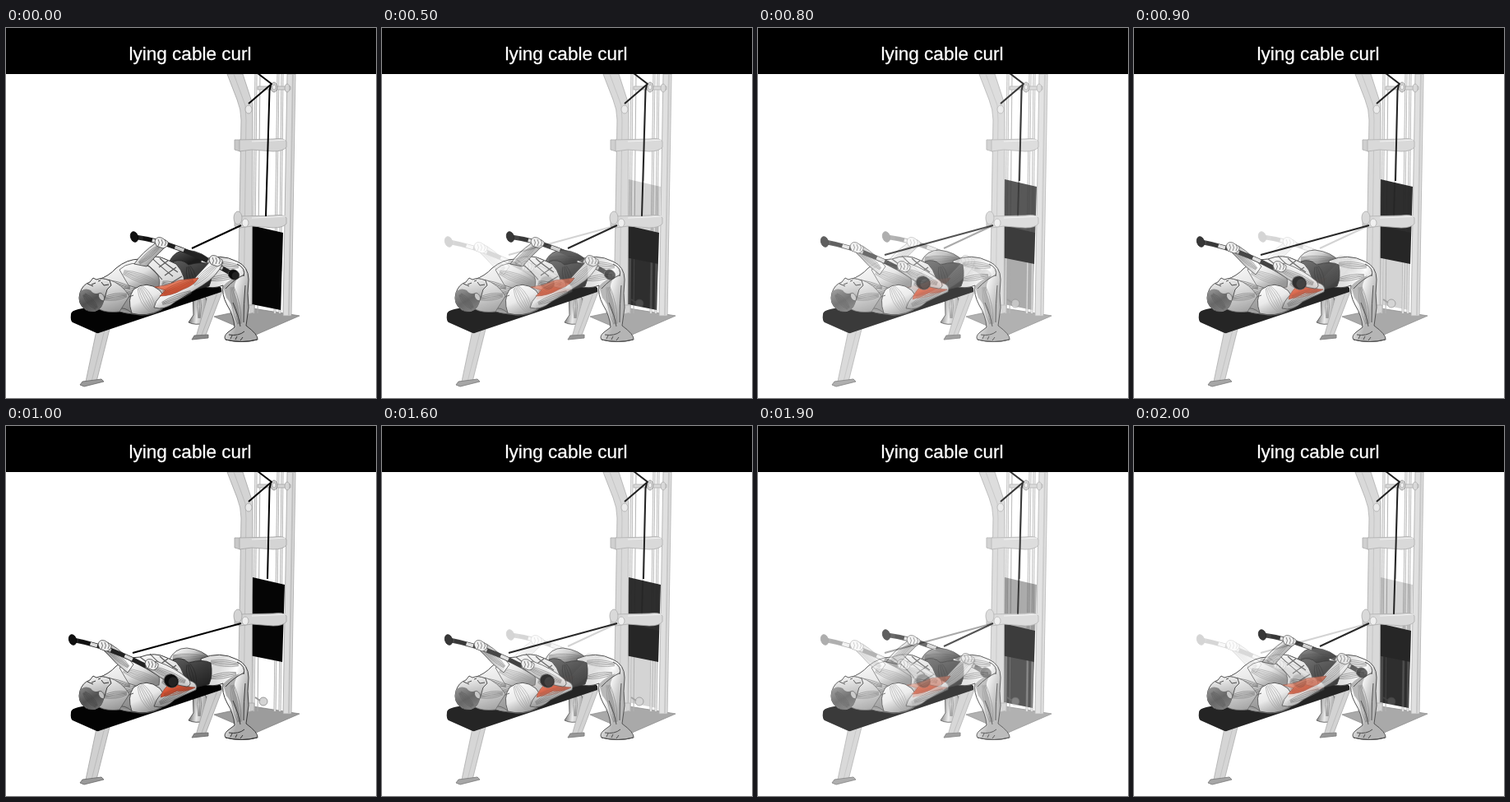
Animation, 450 px wide and 450 px high, one loop 2.1 s. Source, as an HTML page with a canvas:

```html
<!DOCTYPE html>
<html lang="en">
<head>
<meta charset="utf-8">
<title>lying cable curl</title>
<style>
  html, body { margin: 0; width: 100%; height: 100%; overflow: hidden; background: #fff; }
  canvas { display: block; width: 450px; height: 450px; }
</style>
</head>
<body>
<canvas id="stage" width="450" height="450"></canvas>
<script>
const SIZE = 450, LOOP = 2100, STEP = 100;
const INK = '#3a3a3a', METAL = '#d4d4d4', EDGE = '#a2a2a2';
const stage = document.getElementById('stage').getContext('2d');
let g;

function shape(d, fill, stroke, width = 0.8) {
  const path = new Path2D(d);
  if (fill) { g.fillStyle = fill; g.fill(path); }
  if (stroke) { g.strokeStyle = stroke; g.lineWidth = width; g.stroke(path); }
}

const line = (d, color, width = 1) => shape(d, null, color, width);

function oval(x, y, rx, ry, fill, stroke, turn = 0) {
  g.beginPath();
  g.ellipse(x, y, rx, ry, turn, 0, 7);
  g.fillStyle = fill;
  g.fill();
  if (stroke) { g.strokeStyle = stroke; g.lineWidth = 0.8; g.stroke(); }
}

function shade(x1, y1, x2, y2, ...colors) {
  const grad = g.createLinearGradient(x1, y1, x2, y2);
  colors.forEach((c, i) => grad.addColorStop(i / (colors.length - 1), c));
  return grad;
}

// A fan of curved muscle fibres between two points.
function fibres(x1, y1, x2, y2, bow, count, color = '#777') {
  const len = Math.hypot(x2 - x1, y2 - y1);
  const nx = (y1 - y2) / len, ny = (x2 - x1) / len;
  for (let i = 0; i < count; i++) {
    const b = bow * (count > 1 ? 2 * i / (count - 1) - 1 : 1);
    line(`M${x1 + nx * b * .3} ${y1 + ny * b * .3}
      Q${(x1 + x2) / 2 + nx * b} ${(y1 + y2) / 2 + ny * b} ${x2 + nx * b * .3} ${y2 + ny * b * .3}`, color, 0.6);
  }
}

function bracket(y) {
  shape(`M278 ${y}H285V${y + 14}L278 ${y + 12}Z`, '#c8c8c8', EDGE);
  shape(`M284 ${y}L325 ${y - 1}Q338 ${y - 3} 341 ${y + 2}V${y + 9}Q337 ${y + 14} 325 ${y + 14}
    L299 ${y + 12}L284 ${y + 14}Z`, METAL, EDGE);
  line(`M299 ${y + 2}L325 ${y + 1}L340 ${y}`, '#f2f2f2', 1);
}

function stack(x, y) {
  shape(`M${x} ${y}L${x + 39} ${y + 9}L${x + 36} ${y + 103}L${x - 4} ${y + 95}Z`, '#050505');
}

function machine(curled) {
  shape('M253 351L300 341L357 350L304 373Z', '#9c9c9c', '#808080');

  for (const [top, bottom, w] of [[304, 301, 3], [309, 306, 1], [331, 327, 3], [336, 333, 3]]) {
    line(`M${top} 56L${bottom} 347`, '#aaa', w);
    if (w > 1) line(`M${top} 56L${bottom} 347`, '#eee', w - 1.6);
  }
  shape('M342 56H352L347 350H337Z', '#dcdcdc', EDGE);
  line('M349 56L344 350', '#c0c0c0', 2);

  if (curled) {
    oval(313, 335, 5, 5, METAL, '#888');
    line('M303 330L309 334', '#999', 2);
    stack(300, 184);
  } else {
    stack(298, 240);
  }

  shape('M269 56H288L300 93V110L299 346L282 345L286 112Q286 99 281 87Z', METAL, EDGE);
  line('M277 56L291 94L292 112L289 345', '#bdbdbd', 1);
  shape('M290 337H302V346L290 349Z', '#ccc', EDGE);
  oval(295, 99, 4, 5, '#e8e8e8', EDGE);
  bracket(136);
  bracket(229);
  oval(282, 231, 5, 8, METAL, EDGE);
  oval(291, 237, 4, 5, '#eee', EDGE);

  shape('M306 71H346V75H306Z', METAL, EDGE);
  oval(326, 72, 4, 6, '#ccc', '#888');
  oval(326, 72, 2, 3, '#f5f5f5', EDGE);
  oval(342, 73, 3, 5, METAL, EDGE);
  line('M306 55L323 68L295 92', '#000', 2);
  line(`M322 69L320.5 76L${curled ? '318 186' : '316 229'}`, '#000', 2);
}

function farLeg() {
  shape('M227 319Q242 316 244 332L240 351L242 359Q230 362 222 358L228 349Z',
    shade(227, 320, 244, 322, '#777', '#e8e8e8', '#aaa'), INK);
  fibres(235, 324, 235, 353, 4, 4, '#666');
}

function bench() {
  shape('M246 324L264 318L242 376L231 376Z', '#cdcdcd', EDGE);
  line('M257 322L237 376', '#b4b4b4', 1);
  shape('M229 374L246 373V377L226 379Z', '#888', '#666');
  shape('M110 368L127 362L110 430H97Z', '#d0d0d0', EDGE);
  line('M120 367L104 430', '#bbb', 1);
  shape('M93 430L116 427L119 430L95 436L90 434Z', '#999', '#666');
  shape('M79 348Q79 344 88 342L235 313Q257 311 262 316V321L114 370.5Q111 372 108 370L81 358Q78 356 79 348Z', '#030303');
}

function legs(curled) {
  shape('M198 285Q205 270 220 270Q240 272 251 285L234 298Z',
    curled ? shade(205, 270, 220, 297, '#fff', '#ccc', '#555') : shade(205, 270, 215, 290, '#555', '#1c1c1c'), INK);
  if (curled) fibres(203, 281, 244, 283, 7, 5, '#666');
  shape('M237 283Q260 273 281 284Q295 290 295 306Q293 322 295 340L292 362Q307 373 306 379Q288 384 267 379Q264 375 270 370L278 364Q277 350 269 337Q262 324 264 313Q252 318 240 314Z',
    shade(258, 300, 297, 312, '#dcdcdc', '#fff', '#aaa'), INK, 1);
  fibres(249, 287, 283, 290, 6, 5);
  fibres(248, 306, 280, 301, 5, 4, '#666');
  fibres(275, 315, 284, 360, 7, 5, '#666');
  shape('M264 314Q272 305 284 301Q276 310 278 322Q284 338 283 354Q276 338 268 328Z', '#8a8a8aaa');
  line('M267 317Q278 305 290 300M281 287Q292 292 289 302M276 334Q283 350 285 363M291 313Q289 335 289 358', INK, 1);
  line('M267 379Q286 384 305 379M271 373Q283 375 290 369M273 378L275 374M279 379L281 375M285 380L288 376', '#333', 1);
}

function shorts() {
  shape('M203 284Q214 280 222 288Q240 283 249 288Q252 303 247 314L218 321Q203 308 203 284Z',
    shade(215, 280, 235, 320, '#595959', '#3a3a3a', '#222'), '#222');
  fibres(222, 290, 229, 316, 8, 4, '#222');
}

function torso() {
  shape('M112 306Q125 302 134 292Q147 281 163 281Q181 274 196 282L207 287Q220 301 217 321Q199 333 189 343Q174 352 154 348Q133 346 119 336Z',
    shade(150, 278, 171, 350, '#fafafa', '#dcdcdc', '#8a8a8a'), INK, 1);
  shape('M138 294Q151 281 174 290Q190 300 186 315Q165 320 149 313Z',
    shade(150, 284, 168, 318, '#fff', '#e0e0e0', '#888'), '#555');
  fibres(143, 297, 184, 311, 8, 6, '#8c8c8c');
  fibres(120, 308, 151, 316, 5, 5, '#555');
  fibres(125, 325, 158, 318, 6, 4, '#555');
  line('M163 281Q176 290 190 306M175 277Q184 287 203 302M187 280Q194 287 209 297M186 291L197 283M193 301L207 291M201 310L214 302', '#555', 1.1);
  fibres(190, 310, 213, 317, 7, 5, '#555');
  shape('M120 331Q137 318 155 321Q147 334 153 346Q131 344 120 336Z', '#77777788');
  shape('M155 318Q171 306 187 319Q198 331 188 343Q171 352 153 347Q147 330 155 318Z',
    shade(159, 310, 177, 350, '#fff', '#e8e8e8', '#888'), '#444', 1);
  fibres(163, 315, 179, 345, 11, 6, '#909090');
  line('M128 337Q142 329 155 325M133 342Q145 338 153 347', '#555', 1);
}

function head() {
  shape('M111 333L125 306Q141 311 150 326L138 345Q123 347 113 342Z', shade(120, 307, 132, 345, '#f4f4f4', '#999'), '#555');
  fibres(119, 329, 147, 325, 6, 5, '#666');
  shape('M90 322Q93 312 102 309L106 304L110 306Q117 303 126 307L128 313L123 318Q120 331 115 340Q107 348 97 343Q86 335 90 322Z',
    shade(102, 305, 110, 342, '#f6f6f6', '#bbb', '#777'), INK, 1);
  shape('M90 321Q96 315 103 319Q107 325 114 322L119 329Q119 341 108 345Q95 345 89 332Z',
    shade(95, 319, 110, 345, '#7d7d7d', '#505050', '#6b6b6b'));
  fibres(95, 324, 110, 341, 6, 6, '#444');
  oval(116, 327, 3, 5, '#c0c0c0', '#444', -.5);
  line('M99 311L106 314M104 312L109 310M116 309L119 313L125 312M112 308L115 307', '#333', 1);
}

// A bar bent along a quadratic curve; the sections alternate between sleeve and steel.
function bar([x0, y0], [cx, cy], [x1, y1], sections) {
  const at = k => `${(1 - k) ** 2 * x0 + 2 * k * (1 - k) * cx + k * k * x1} ${(1 - k) ** 2 * y0 + 2 * k * (1 - k) * cy + k * k * y1}`;
  line(`M${at(0)}Q${cx} ${cy} ${x1} ${y1}`, '#222', 5.5);
  for (const [from, to, color] of sections) line(`M${at(from)}L${at(to)}`, color, 4);
  oval(x0, y0, 4.5, 6.5, '#101010', '#000', -.3);
}

function weightEnd(x, y, r) {
  oval(x, y, r, r - 1, '#0c0c0c', '#555', .5);
  oval(x + 2, y + 1, r * .6, r * .65, '#222', null, .5);
}

function hand(x, y) {
  shape(`M${x - 8} ${y - 1}Q${x - 7} ${y - 8} ${x} ${y - 6}L${x + 8} ${y - 1}Q${x + 9} ${y + 5} ${x + 2} ${y + 7}L${x - 6} ${y + 4}Z`,
    '#eee', '#444');
  for (let i = -4; i < 6; i += 4) line(`M${x + i} ${y - 4}Q${x + i + 3} ${y} ${x + i} ${y + 4}`, '#555', 0.8);
}

function loweredArms() {
  shape('M156 287Q165 273 183 261L194 266Q181 278 171 290Z', shade(165, 270, 179, 284, '#fff', '#999'), INK);
  fibres(162, 286, 187, 265, 5, 5, '#666');
  line('M286 240L226 268', '#000', 2);
  bar([156, 254], [209, 261], [277, 300], [[.1, .2, '#111'], [.2, .27, '#ddd'], [.44, .53, '#ccc'], [.76, .9, '#bbb']]);
  hand(189, 261);
  shape('M180 340Q183 324 205 316L228 306L251 281L264 285Q257 302 239 313Q219 325 206 333Q193 344 180 340Z',
    shade(215, 300, 230, 327, '#fff', '#eee', '#888'), INK);
  fibres(228, 312, 257, 287, 6, 5, '#888');
  fibres(190, 335, 225, 321, 5, 4, '#555');
  shape('M181 315Q196 314 210 307L234 304Q229 313 215 318Q201 326 187 326L194 319Z',
    shade(202, 306, 209, 327, '#ef987c', '#d95a3a', '#b64730'), '#98412f', 0.7);
  fibres(191, 322, 228, 307, 6, 5, '#a34932');
  hand(255, 283);
  weightEnd(277, 300, 7);
}

function curledArms() {
  shape('M117 271L127 265Q144 276 155 290L148 300Q134 290 125 279Z', shade(126, 282, 144, 275, '#999', '#fff'), INK);
  fibres(124, 271, 149, 293, 5, 5, '#666');
  line('M286 240L154 276', '#000', 2);
  bar([81, 260], [141, 271], [200, 310], [[.06, .18, '#111'], [.18, .25, '#ddd'], [.33, .39, '#ccc'], [.53, .61, '#ddd'], [.75, .9, '#bbb']]);
  hand(120, 267);
  shape('M180 341Q184 326 201 317L222 309Q235 313 231 321Q217 327 205 333Q193 345 180 341Z',
    shade(203, 309, 211, 339, '#f4f4f4', '#c4c4c4', '#777'), INK);
  fibres(187, 337, 224, 318, 6, 5, '#555');
  shape('M189 326Q196 313 207 308Q214 318 230 318Q222 323 208 322Q197 328 188 330Z',
    shade(199, 308, 209, 329, '#e98666', '#d55132', '#ad432e'), '#98412f', 0.7);
  fibres(192, 327, 223, 319, 5, 5, '#a34932');
  shape('M169 293L183 286Q206 294 222 308Q227 315 220 317Q203 315 188 306Z',
    shade(200, 291, 191, 311, '#fff', '#aaa'), INK);
  fibres(179, 294, 218, 311, 6, 5, '#666');
  hand(177, 290);
  weightEnd(201, 310, 9);
}

function pose(curled) {
  const layer = document.createElement('canvas');
  layer.width = layer.height = SIZE;
  g = layer.getContext('2d');
  g.lineJoin = 'round';
  machine(curled);
  farLeg();
  bench();
  legs(curled);
  shorts();
  torso();
  head();
  (curled ? curledArms : loweredArms)();
  return layer;
}

// Share of the curled pose in the stepped cross-fade.
function curlAmount(t) {
  if (t < 500) return 0;
  if (t < 1000) return (Math.floor((t - 500) / STEP) + 1) / 6;
  if (t < 1600) return 1;
  return (5 - Math.floor((t - 1600) / STEP)) / 6;
}

const lowered = pose(false), curled = pose(true);
const start = performance.now();

function draw() {
  const amount = curlAmount((performance.now() - start) % LOOP);
  stage.globalAlpha = 1;
  stage.fillStyle = '#fff';
  stage.fillRect(0, 0, SIZE, SIZE);
  stage.globalAlpha = 1 - amount;
  stage.drawImage(lowered, 0, 0);
  stage.globalAlpha = amount;
  stage.drawImage(curled, 0, 0);
  stage.globalAlpha = 1;
  stage.fillStyle = '#000';
  stage.fillRect(0, 0, SIZE, 56);
  stage.fillStyle = stage.strokeStyle = '#fff';
  stage.font = '22.5px "Liberation Sans", Arial, sans-serif';
  stage.textAlign = 'center';
  stage.lineWidth = 0.3;
  stage.fillText('lying cable curl', 224, 39);
  stage.strokeText('lying cable curl', 224, 39);
  requestAnimationFrame(draw);
}
draw();
</script>
</body>
</html>
```
